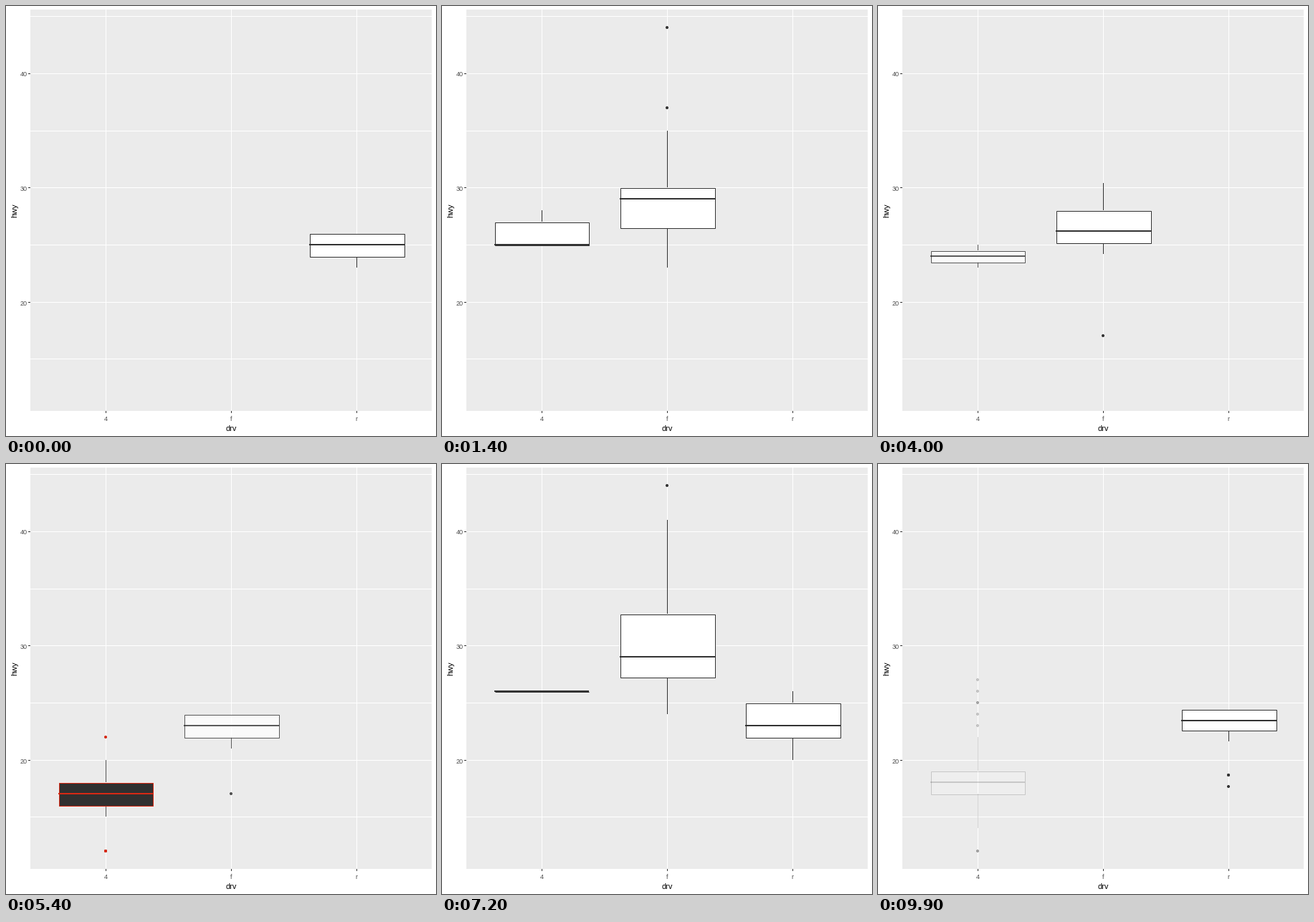
Animation, 600 px wide and 600 px high, one loop 10000 ms. Source, as a matplotlib script:

```python
import math

import numpy as np
import matplotlib.pyplot as plt
from matplotlib.animation import FuncAnimation
from matplotlib.patches import Circle, Rectangle

PX = 0.72  # points per pixel at 100 dpi
DARK, WHITE = (0.2, 0.2, 0.2), (1, 1, 1)
STARTS = [10, 25, 40, 54, 68, 82, 96]  # first frame of each transition
STEPS = 5
DRIVES = {"4": 139.3, "f": 314.4, "r": 489.5}
HALF = 65.6

# Per vehicle class: drive -> (low, q1, median, q3, high, outliers)
STATES = [
    {"r": (23, 24, 25, 26, 26, [])},
    {"4": (25, 25, 25, 27, 28, []), "f": (23, 26.5, 29, 30, 35, [37, 44])},
    {"4": (23, 23.5, 24, 24.5, 25, []), "f": (25, 26, 27, 29, 32, [])},
    {"f": (21, 22, 23, 24, 24, [17])},
    {"4": (15, 16, 17, 18, 20, [22, 12, 12, 12])},
    {"4": (26, 26, 26, 26, 26, []), "f": (24, 27.25, 29, 32.75, 41, [44]),
     "r": (20, 22, 23, 25, 26, [])},
    {"4": (14, 17, 18, 19, 22, [27, 26, 25, 25, 24, 23, 12, 12]),
     "r": (16, 17, 17, 18, 18, [20, 15, 20])},
]

RGB_XYZ = np.array([[0.4124, 0.3576, 0.1805],
                    [0.2126, 0.7152, 0.0722],
                    [0.0193, 0.1192, 0.9505]])
WHITE_XYZ = RGB_XYZ.sum(axis=1)


def to_lab(rgb):
    c = np.array(rgb, float)
    lin = np.where(c > 0.04045, ((c + 0.055) / 1.055) ** 2.4, c / 12.92)
    v = RGB_XYZ @ lin / WHITE_XYZ
    f = np.where(v > 0.008856, np.cbrt(v), 7.787 * v + 16 / 116)
    return np.array([116 * f[1] - 16, 500 * (f[0] - f[1]), 200 * (f[1] - f[2])])


def to_rgb(lab):
    fy = (lab[0] + 16) / 116
    f = np.array([fy + lab[1] / 500, fy, fy - lab[2] / 200])
    v = np.where(f > 0.2069, f ** 3, (f - 16 / 116) / 7.787)
    lin = np.clip(np.linalg.solve(RGB_XYZ, v * WHITE_XYZ), 0, 1)
    c = np.where(lin > 0.0031308, 1.055 * lin ** (1 / 2.4) - 0.055, 12.92 * lin)
    return tuple(np.clip(c, 0, 1))


def mix(a, b, t):
    return to_rgb(to_lab(a) * (1 - t) + to_lab(b) * t)


def ypix(v):
    return math.floor(413.05 - 15.935 * (v - 20) + 1e-6)


fig = plt.figure(figsize=(6, 6), dpi=100, facecolor="white")
ax = fig.add_axes([0, 0, 1, 1])
ax.set_xlim(0, 600)
ax.set_ylim(600, 0)
ax.axis("off")
live = []


def bar(x, y, w, h, color, z=1):
    return ax.add_patch(Rectangle((x, y), w, h, fc=color, lw=0, zorder=z))


def label(x, y, s, size, color, ha="center", rot=0):
    ax.text(x, y, s, fontsize=size * PX, color=color, ha=ha, va="baseline",
            rotation=rot, rotation_mode="anchor", family="Liberation Sans")


def draw_axes():
    bar(34, 5, 560, 560, "#ebebeb")
    for v in range(15, 50, 5):
        bar(34, ypix(v), 560, 1, "white")
    for v in (20, 30, 40):
        y = ypix(v)
        bar(31, y, 3, 1, "#333333")
        label(29.5, y + 4.5, str(v), 9, "#4d4d4d", "right")
    for name, cx in DRIVES.items():
        x = math.floor(cx)
        bar(x, 5, 1, 560, "white")
        bar(x, 565, 1, 3, "#333333")
        label(x, 579, name, 9, "#4d4d4d")
    label(314, 593, "drv", 11, "black")
    label(15, 285.5, "hwy", 11, "black", rot=90)


def boxplot(drive, stats, line=DARK, fill=WHITE, stem=DARK, alpha=1):
    cx = DRIVES[drive]
    x, left, right = (math.floor(v) for v in (cx, cx - HALF, cx + HALF))
    low, q1, med, q3, high = (ypix(v) for v in stats[:5])
    ink, paper = (*line, alpha), (*fill, alpha)
    for v in stats[5]:
        live.append(ax.add_patch(Circle((x, ypix(v)), 1.5, fc=ink, ec=ink,
                                        lw=PX, zorder=2)))
    for top, bottom in ((high, q3), (q1, low)):
        if bottom > top:
            live.append(bar(x, top, 1, bottom - top, (*stem, alpha), 3))
    live.append(ax.add_patch(Rectangle(
        (left + 0.5, q3 + 0.5), right - left, q1 - q3, fc=paper, ec=ink,
        lw=PX, joinstyle="miter", zorder=4)))
    live.append(bar(left, med - 1, right - left + 1, 2, ink, 5))


def tween(a, b, t):
    # An empty set of outliers counts as all points at the other set's mean
    pa = a[5] or [np.mean(b[5])] * len(b[5])
    pb = b[5] or [np.mean(a[5])] * len(a[5])
    nums = [u + (v - u) * t for u, v in zip(a[:5], b[:5])]
    return (*nums, [u + (v - u) * t for u, v in zip(pa, pb)])


def phase(frame):
    """Index of the state being left and the progress to the next one."""
    for i in reversed(range(len(STARTS))):
        if frame >= STARTS[i]:
            return i, min(1, (frame - STARTS[i] + 1) / STEPS)
    return 0, 0


def update(frame):
    while live:
        live.pop().remove()
    i, t = phase(frame)
    old, new = STATES[i], STATES[(i + 1) % len(STATES)]
    if t in (0, 1):
        for drive, stats in (new if t else old).items():
            boxplot(drive, stats)
        return live
    for drive in DRIVES:
        a, b = old.get(drive), new.get(drive)
        if a and b:
            boxplot(drive, tween(a, b, t))
        elif a:
            boxplot(drive, a, alpha=1 - t)
        elif b:
            boxplot(drive, b, mix((1, 0, 0), DARK, t), mix((0, 0, 0), WHITE, t),
                    mix((0.38, 0.38, 0.38), DARK, t))
    return live


draw_axes()
anim = FuncAnimation(fig, update, frames=100, interval=100, repeat=True,
                     repeat_delay=0, init_func=lambda: update(0), blit=False)
plt.show()
```
